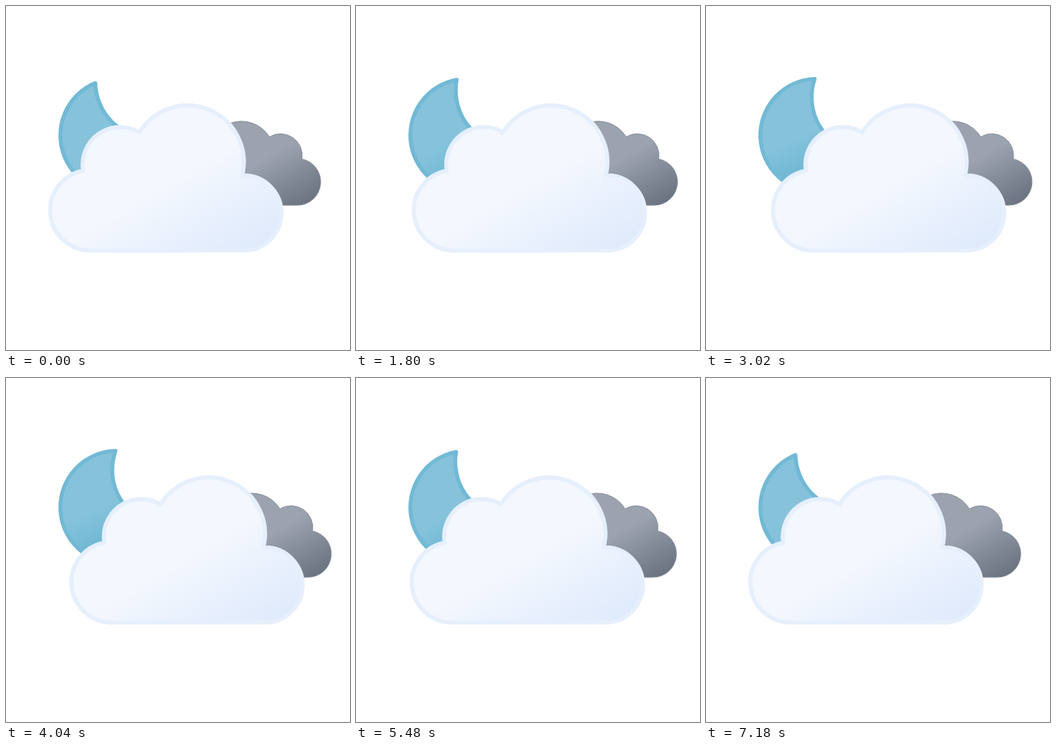
Write an HTML page with a canvas that moves like this. It is 480 by 480 pixels and loops after 7.22 s.

```html
<!DOCTYPE html>
<html lang="en">
<head>
<meta charset="utf-8">
<title>Overcast night</title>
<style>
  html, body { margin: 0; width: 100%; height: 100%; overflow: hidden; background: #fff; }
  canvas { display: block; width: 480px; height: 480px; }
</style>
</head>
<body>
<canvas id="stage" width="480" height="480"></canvas>
<script>
const ctx = document.getElementById('stage').getContext('2d');
const LOOP = 7220, HALF = 3600;
const UNIT = 480 / 512;
const RAD = Math.PI / 180;

const moon = {
  path: crescent(84, 95.2, 48 * RAD),
  line: 6, edge: '#72b9d5',
  fill: gradient(-53, -69, 31, 76, '#86c3db', '#5eafcf')
};
const darkCloud = {
  path: new Path2D('M.5 93.2a32.4 32.4 0 0 0 32.4 32.4h129.8v-.1l2.3.1a34.8 34.8 0 0 0 6.5-68.9 32.4 32.4 0 0 0-48.5-33 48.6 48.6 0 0 0-88.6 37.1h-1.5A32.4 32.4 0 0 0 .5 93.2Z'),
  line: 1, edge: '#848b98',
  fill: gradient(52.7, 9.6, 133.4, 149.3, '#9ca3af', '#6b7280')
};
const lightCloud = {
  path: new Path2D('m291 107-2.5.1A83.9 83.9 0 0 0 135.6 43 56 56 0 0 0 51 91a56.6 56.6 0 0 0 .8 9A60 60 0 0 0 63 219l4-.2v.2h224a56 56 0 0 0 0-112Z'),
  line: 6, edge: '#e6effc',
  fill: gradient(99.5, 30.7, 232.6, 261.4, '#f3f7fe', '#deeafb')
};

function gradient(x1, y1, x2, y2, from, to) {
  const g = ctx.createLinearGradient(x1, y1, x2, y2);
  g.addColorStop(0, from);
  g.addColorStop(0.45, from);
  g.addColorStop(1, to);
  return g;
}

// Disc of radius r with an equal disc cut out at distance d; angle is clockwise from up.
function crescent(r, d, angle) {
  const p = new Path2D();
  const dir = angle - Math.PI / 2;
  const half = Math.acos(d / 2 / r);
  p.arc(0, 0, r, dir - half, dir + half, true);
  p.arc(d * Math.cos(dir), d * Math.sin(dir), r, dir + Math.PI - half, dir + Math.PI + half);
  p.closePath();
  return p;
}

function draw(shape, x, y, turn = 0) {
  ctx.save();
  ctx.translate(x, y);
  ctx.rotate(turn * RAD);
  ctx.fillStyle = shape.fill;
  ctx.fill(shape.path);
  ctx.strokeStyle = shape.edge;
  ctx.lineWidth = shape.line;
  ctx.stroke(shape.path);
  ctx.restore();
}

function render(t) {
  const there = t < HALF;
  const swing = there ? t / HALF : Math.max(0, 2 - t / HALF);
  // Clouds settle softly on the way out and return at a steady pace.
  const drift = there ? swing * (0.5 + swing * (2 - 1.5 * swing)) : swing;
  const side = 2 * drift - 1;

  ctx.setTransform(1, 0, 0, 1, 0, 0);
  ctx.fillStyle = '#fff';
  ctx.fillRect(0, 0, 480, 480);
  ctx.scale(UNIT, UNIT);
  ctx.lineJoin = ctx.lineCap = 'round';

  draw(moon, 165, 192.5, -15 + 24 * swing);
  draw(darkCloud, 278 + 9 * side, 171);
  draw(lightCloud, 81 + 18 * side, 145);
}

const start = performance.now();
function tick() {
  render((performance.now() - start) % LOOP);
  requestAnimationFrame(tick);
}
tick();
</script>
</body>
</html>
```
